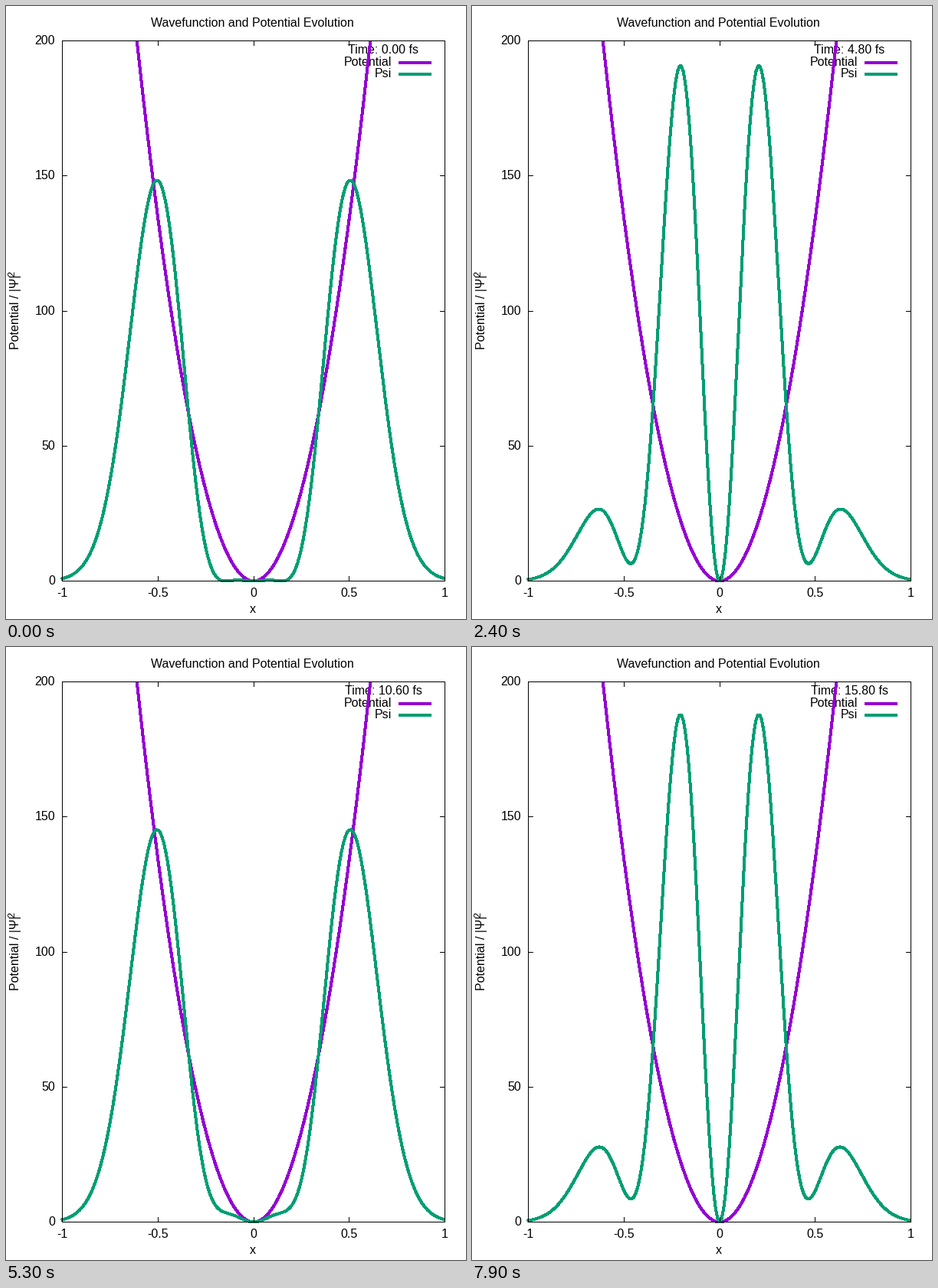
A matplotlib script that plays this animation: 600 by 800 pixels, repeating every 8 s.

```python
import numpy as np
import matplotlib
import matplotlib.pyplot as plt
from matplotlib.animation import FuncAnimation
from matplotlib.patches import Rectangle

matplotlib.rcParams["font.family"] = "Liberation Sans"

W, H, DPI = 600, 800, 100
PT = 72 / DPI                      # points per pixel
FRAMES, INTERVAL, DT = 80, 100, 0.2
PURPLE, GREEN = "#9400d3", "#009e73"
LEFT, RIGHT, TOP, BOTTOM = 73.5, 572.5, 45.5, 750.5

# Aliased strokes fill every pixel they touch, so they come out a pixel wider
THIN, THICK = 0.8, 3

A = 0.2828                         # oscillator length
BEAT = 11.117                      # beat period of the two states, fs
STIFF = 537                        # potential V = STIFF * x^2


def px(x):
    return (LEFT + RIGHT) / 2 + x * (RIGHT - LEFT) / 2


def py(y):
    return BOTTOM - y * (BOTTOM - TOP) / 200


fig = plt.figure(figsize=(W / DPI, H / DPI), dpi=DPI, facecolor="white")
ax = fig.add_axes([0, 0, 1, 1])
ax.set_xlim(0, W)
ax.set_ylim(H, 0)
ax.axis("off")


def label(x, y, s, ha="center", size=16, **kw):
    return ax.text(x, y, s, ha=ha, va="baseline", fontsize=size * PT,
                   color="black", zorder=1, **kw)


def line(xs, ys, color="black", width=THIN, z=5):
    return ax.plot(xs, ys, color=color, lw=width * PT, antialiased=False,
                   solid_capstyle="butt", solid_joinstyle="round",
                   snap=False, zorder=z)[0]


def curve(xs, ys, color, z):
    ln = line(xs, ys, color, THICK, z)
    ln.set_solid_capstyle("projecting")
    ln.set_clip_path(Rectangle((71, 45), 502, 709, transform=ax.transData))
    return ln


def tic(x, y, dx, dy):
    line([x, x + dx], [y, y + dy])


# Frame, tics and tic labels
for y in (TOP, BOTTOM):
    tic(LEFT, y, RIGHT - LEFT, 0)
for x in (LEFT, RIGHT):
    tic(x, TOP, 0, BOTTOM - TOP)
for v in (-1, -0.5, 0, 0.5, 1):
    x = np.floor(px(v)) + 0.5
    tic(x, BOTTOM, 0, -6)
    tic(x, TOP, 0, 6)
    label(px(v) - 0.5, 771, f"{v:g}")
for v in range(0, 201, 50):
    y = np.floor(py(v)) + 0.5
    tic(LEFT, y, 6, 0)
    tic(RIGHT, y, -6, 0)
    label(64, y + 4.5, str(v), "right")

# Titles
label(321.5, 27, "Wavefunction and Potential Evolution")
label(322, 792, "x")
label(17, 448.5, "Potential / |Ψ|", "left", rotation=90, rotation_mode="anchor")
label(11, 353, "2", "left", 12.8, rotation=90, rotation_mode="anchor")

# Key
clock = label(492, 62, "")
for name, y, color, z in (("Potential", 74, PURPLE, 2), ("Psi", 89, GREEN, 3)):
    label(503, y + 4, name, "right")
    line([512, 555], [y, y], color, THICK, z)

# First and third excited states, equal weights
x = np.linspace(-1, 1, 201)
xi = x / A
bell = np.exp(-xi**2 / 2) / (np.pi**0.25 * np.sqrt(A))
phi1 = np.sqrt(2) * xi * bell
phi3 = (2 * xi**3 - 3 * xi) / np.sqrt(3) * bell

curve(px(x), py(STIFF * x**2), PURPLE, 2)
wave = curve(px(x), py(0 * x), GREEN, 3)


def update(i):
    t = i * DT
    psi = (phi1 + phi3 * np.exp(-2j * np.pi * t / BEAT)) / np.sqrt(2)
    wave.set_ydata(py(100 * np.abs(psi)**2))
    clock.set_text(f"Time: {t:.2f} fs")
    return wave, clock


anim = FuncAnimation(fig, update, frames=FRAMES, interval=INTERVAL,
                     repeat=True, repeat_delay=0, blit=False)
plt.show()
```
